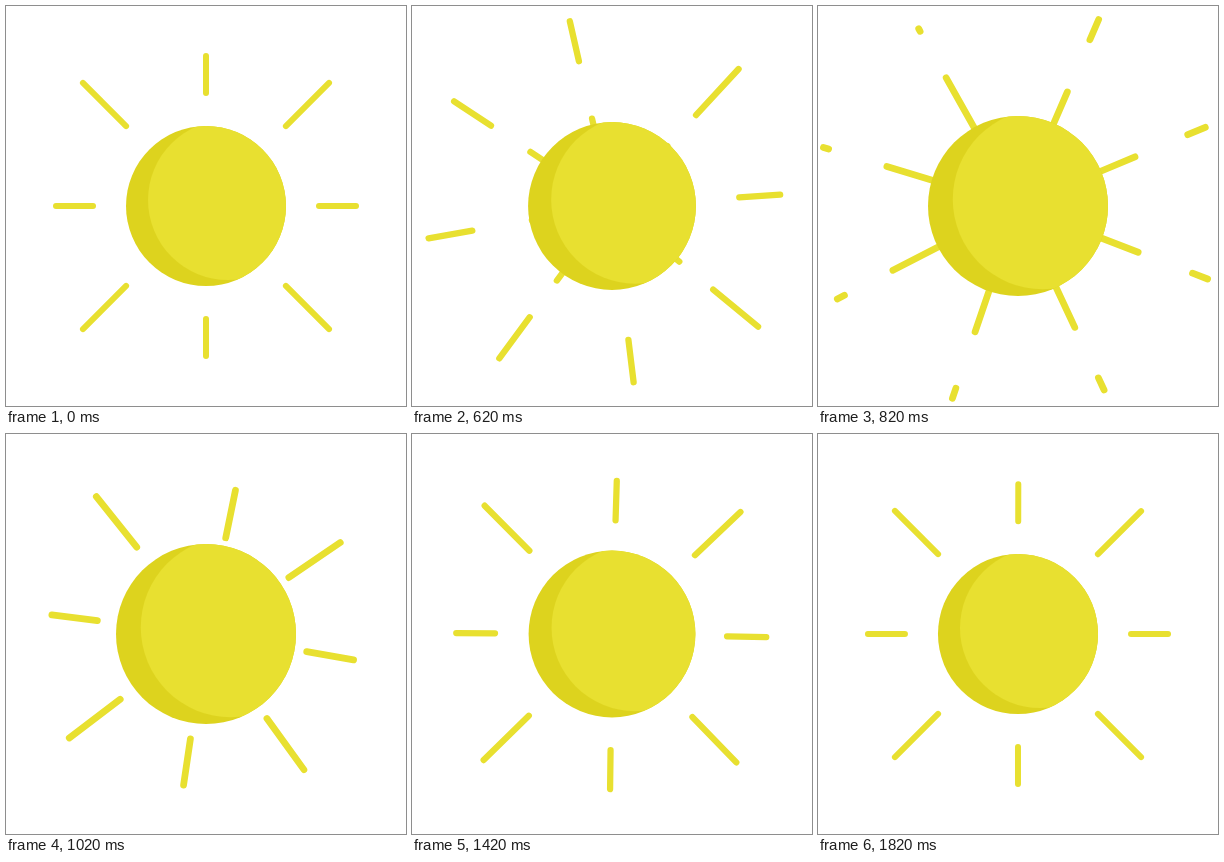
An HTML page with a canvas for the animation above (1.85 s loop, 400 by 400 pixels).

```html
<!DOCTYPE html>
<html lang="en">
<head>
<meta charset="utf-8">
<title>Sun</title>
<style>
  html, body { margin: 0; width: 100%; height: 100%; overflow: hidden; background: #fff; }
  canvas { display: block; }
</style>
</head>
<body>
<canvas id="stage" width="400" height="400"></canvas>
<script>
const ctx = document.getElementById('stage').getContext('2d');
const LOOP = 1850, START = 512;
const LIGHT = '#e8e030', DARK = '#ddd31e';
const RADIUS = 80, RAY_START = 113, RAY_LIMIT = 180.6, SHORT = 37, LONG = 61;
const STAGGER = 0.0185;

const clamp = x => Math.min(1, Math.max(0, x));
const mix = (a, b, p) => a + (b - a) * p;
const easeOut = x => 1 - (1 - clamp(x)) ** 2;

// The whole sequence runs on a clock that slows down towards its end.
function clock(time) {
  const t = Math.max(0, time - START);
  return 0.001476 * t - 4.98e-7 * t * t;
}

function disc(x, y, color) {
  ctx.beginPath();
  ctx.arc(x, y, RADIUS, 0, 2 * Math.PI);
  ctx.fillStyle = color;
  ctx.fill();
}

function dash(from, to) {
  if (from > RAY_LIMIT) return;
  ctx.beginPath();
  ctx.moveTo(0, -from);
  ctx.lineTo(0, -Math.min(to, RAY_LIMIT));
  ctx.stroke();
}

// Each ray turns one place back while its dash flies out and a new one follows.
function ray(i, u) {
  const p = easeOut(u - STAGGER * i);
  const long = i % 2;
  const length = long ? mix(LONG, SHORT, p) : mix(SHORT, LONG, p);
  const outer = RAY_START + 100 * p;
  ctx.save();
  ctx.rotate((-i - p) * Math.PI / 4);
  dash(outer, outer + length);
  dash(outer - 100, outer - 100 + length);
  ctx.restore();
}

function draw(time) {
  const u = clock(time);
  const swell = clamp(u / 0.395) * clamp((1.08 - u) / 0.44);
  const scale = 1 + 0.125 * swell;

  ctx.clearRect(0, 0, 400, 400);
  ctx.save();
  ctx.translate(200, 200);
  ctx.scale(scale, scale);

  ctx.strokeStyle = LIGHT;
  ctx.lineWidth = 6;
  ctx.lineCap = 'round';
  for (let i = 0; i < 8; i++) ray(i, u);

  disc(0, 0, DARK);
  ctx.clip();
  disc(22, -6, LIGHT);
  ctx.restore();
}

const begin = performance.now();
function frame() {
  draw((performance.now() - begin) % LOOP);
  requestAnimationFrame(frame);
}
frame();
</script>
</body>
</html>
```
